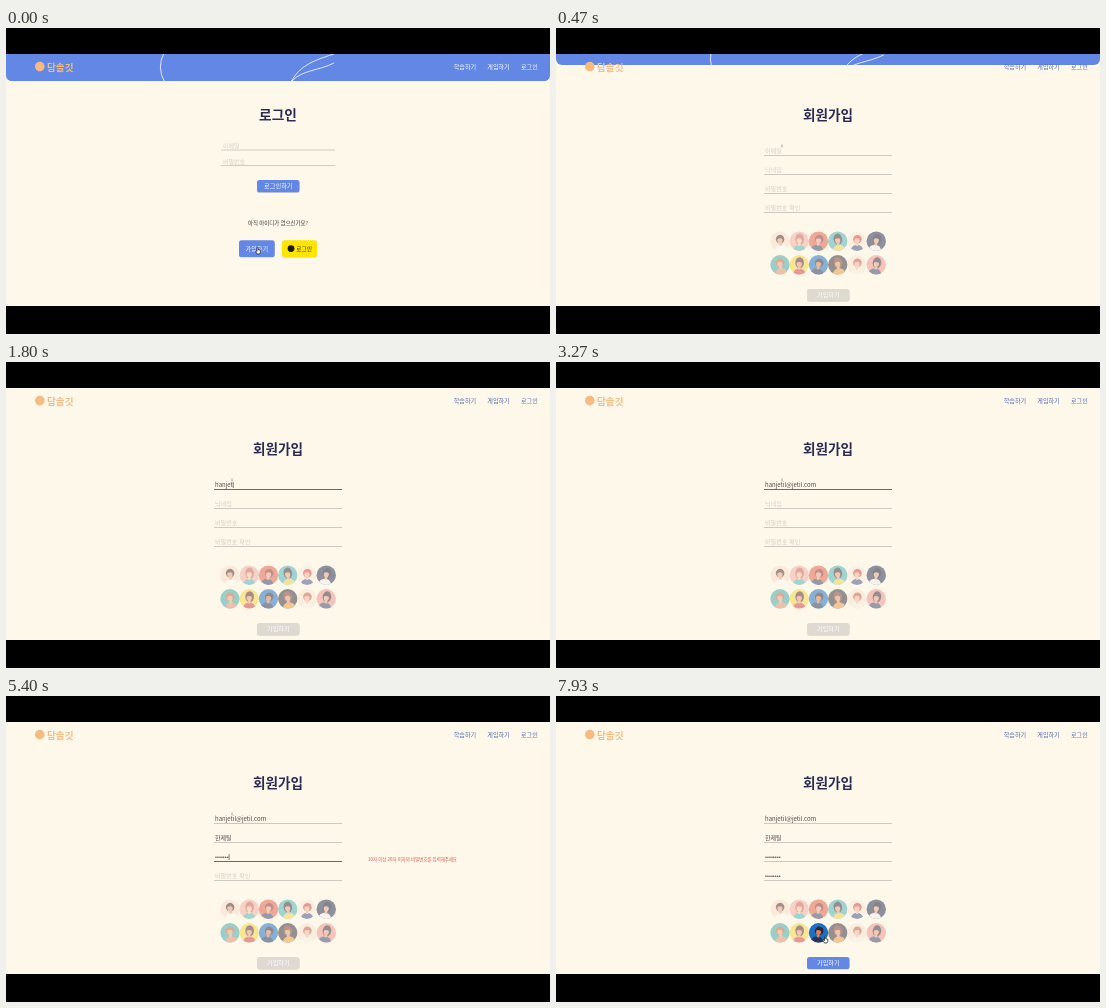
An HTML page for the animation above (8 s loop, 544 by 306 pixels).

```html
<!DOCTYPE html>
<html lang="ko">
<head>
<meta charset="utf-8">
<title>회원가입</title>
<style>
html, body { margin: 0; width: 100%; height: 100%; overflow: hidden; background: #000; }
#stage { display: block; width: 100vw; height: 100vh; }
text { font-family: "Noto Sans CJK KR", "Noto Sans CJK JP", "Noto Sans", sans-serif; white-space: pre; }
.dots { font-family: "Liberation Sans", sans-serif; }
</style>
</head>
<body>
<svg id="stage" viewBox="0 0 544 306"></svg>
<script>
const LOOP = 8000, SWITCH = 160, SELECT = 7930;
const BLUE = '#6387e4', CREAM = '#fdf8ea', INK = '#2b2a54', PALE = '#d3cec3';
const stage = document.getElementById('stage');
const el = id => document.getElementById(id);
const set = (id, attrs) => { for (const k in attrs) el(id).setAttribute(k, attrs[k]); };
const show = (id, on) => set(id, { visibility: on ? 'visible' : 'hidden' });

// Text placed by its left edge (or middle) and vertical centre.
function label(x, cy, size, fill, str, extra = '') {
  return `<text x="${x}" y="${cy + size * 0.37}" font-size="${size}" fill="${fill}" ${extra}>${str}</text>`;
}
const MID = 'text-anchor="middle"';

function button(x, y, w, h, fill, id = '') {
  return `<rect x="${x}" y="${y + 0.7}" width="${w}" height="${h}" rx="2.6" fill="#000" opacity=".14"/>
    <rect ${id} x="${x}" y="${y}" width="${w}" height="${h}" rx="2.6" fill="${fill}"/>`;
}
const line = (x1, x2, y, id = '') =>
  `<path ${id} d="M${x1} ${y}H${x2}" stroke="#c8c4bc" stroke-width=".9"/>`;

// background, hair, skin, clothes
const people = [
  ['#fbdccb', '#4a2f35', '#e9a183', '#fffaf2'], ['#f3aca6', '#c8625a', '#f3c2a8', '#4fb5b8'],
  ['#e2604f', '#8e2f3a', '#eda488', '#38456f'], ['#4fb3b8', '#38333f', '#e9a183', '#f3cf58'],
  ['#fbeadb', '#d8404c', '#f0b59a', '#43538a'], ['#2b3358', '#181c33', '#e5a38c', '#f3f0ee'],
  ['#3fa9ab', '#c9603f', '#eba585', '#e58d6b'], ['#f2d843', '#5b2a33', '#e79d84', '#d6404f'],
  ['#1d6fc6', '#2a2638', '#d9805c', '#25365c'], ['#36323d', '#7b4033', '#e29875', '#ee9a3e'],
  ['#fbe3d3', '#c05d55', '#f0b9a0', '#f4efe6'], ['#f0938f', '#3a2d42', '#e7a08a', '#3c4775']
];
const CHOSEN = 8;

function avatar([bg, hair, skin, body], i) {
  const x = 224 + (i % 6) * 19.25, y = i < 6 ? 213.2 : 236.8;
  const tilt = (i % 3 - 1) * 9;
  return `<g id="a${i}" opacity=".52" transform="translate(${x} ${y})"><circle r="9.7" fill="${bg}"/>
    <g clip-path="url(#disc)"><g transform="rotate(${tilt})">
    <ellipse cx=".4" cy="-2" rx="4.3" ry="${i % 2 ? 5.6 : 4.3}" fill="${hair}"/>
    <path d="M-7 11Q-6 4 0 3.6Q6 4 7 11Z" fill="${body}"/>
    <path d="M-1.2 0H1.4V4.2Q0 5.2-1.2 4.2Z" fill="${skin}"/>
    <ellipse cx="0" cy="-1" rx="2.6" ry="3.3" fill="${skin}"/>
    <path d="M-3-2Q-2-6 1-5.5Q4-5 3-1.5Q1-4-3-2Z" fill="${hair}"/></g></g></g>`;
}

// Each field: row centre, hint, focus span, key times and what each key leaves.
const mail = 'hanjetil@jetil.com';
const bullets = n => '•'.repeat(n);
const typed = (n, fn) => Array.from({ length: n }, (_, i) => fn(i + 1));
const fields = [
  { y: 123, hint: '이메일', from: 1330, to: 3400, out: typed(18, n => mail.slice(0, n)),
    keys: [1470, 1530, 1670, 1730, 1770, 1800, 1930, 2000, 2130, 2270, 2400, 2470, 2530, 2600, 2730, 2800, 2930, 3070] },
  { y: 142, hint: '닉네임', from: 3400, to: 4470,
    out: ['ㅎ', '하', '한', '한ㅈ', '한제', '한젵', '한제티', '한제틸'],
    keys: [3670, 3730, 3800, 4000, 4070, 4130, 4200, 4330] },
  { y: 161, hint: '비밀번호', from: 4470, to: 5930, out: typed(8, bullets), dots: true,
    keys: [4730, 4930, 5000, 5130, 5270, 5330, 5400, 5530] },
  { y: 180, hint: '비밀번호 확인', from: 5930, to: 6930, out: typed(8, bullets), dots: true,
    keys: [6000, 6070, 6200, 6270, 6330, 6470, 6530, 6730] }
];

function fieldMarkup(f, i) {
  return label(209, f.y, 6.1, PALE, f.hint, `id="h${i}"`) +
    label(209, f.y, f.dots ? 5.6 : 6, '#4c4a4a', '', `id="v${i}" ${f.dots ? 'class="dots"' : ''}`) +
    line(208, 336, f.y + 4.5, `id="l${i}"`) +
    `<path id="c${i}" stroke="#333" stroke-width=".6"/>`;
}

const loginPage = `<g id="login">
  ${label(272, 87, 13.7, INK, '로그인', MID + ' font-weight="700"')}
  ${label(217, 117.3, 6, PALE, '이메일')}${line(215, 329, 122)}
  ${label(217, 133.3, 6, PALE, '비밀번호')}${line(215, 329, 137.6)}
  ${button(251, 152, 42.5, 12.3, BLUE)}${label(272.3, 158.2, 6.2, '#fff', '로그인하기', MID)}
  ${label(272, 195.5, 5.4, '#3b3939', '아직 아이디가 없으신가요?', MID + ' font-weight="500"')}
  ${button(233, 212.3, 35.7, 16.7, BLUE)}${label(250.8, 220.8, 6.1, '#fff', '가입하기', MID)}
  ${button(276, 212.3, 35, 16.7, '#fee502')}<circle cx="285" cy="220.6" r="3.4" fill="#1d1a12"/>
  ${label(290.3, 220.8, 5.7, '#2b2610', '로그인')}</g>`;

const joinPage = `<g id="join">
  ${label(272, 87, 13.6, INK, '회원가입', MID + ' font-weight="700"')}
  ${fields.map(fieldMarkup).join('')}
  ${label(362, 163, 4.42, '#e2544c', '10자 이상 20자 이하의 비밀번호를 입력해주세요', 'id="err1"')}
  ${label(363, 182.3, 4.42, '#e2544c', '비밀번호가 일치하지 않습니다', 'id="err2"')}
  ${people.map(avatar).join('')}
  ${button(251, 261, 42.5, 12, '#dedad2', 'id="send"')}
  ${label(272.3, 267.2, 6.1, '#fff', '가입하기', MID)}</g>`;

stage.innerHTML = `<clipPath id="disc"><circle r="9.7"/></clipPath>
  <rect y="26" width="544" height="252" fill="${CREAM}"/>
  <svg id="head" y="26" width="544" height="27.3"><rect id="bar" y="-10" width="544" rx="6" fill="${BLUE}"/>
    <g id="arcs" fill="none" stroke="#fff" stroke-width=".8">
    <path d="M158 -1Q150.500 13 158.500 28"/><path d="M285 28C293 13 305 7 328 0"/>
    <path d="M286 27C296 16 312 17 328 9"/></g></svg>
  <circle cx="33.8" cy="38.6" r="4.8" fill="#f6bb80"/>
  ${label(41, 39.3, 9.6, '#f5bc84', '담솔깃', 'font-weight="700"')}
  <g id="nav">${label(447.700, 39, 6.1, 'inherit', '학습하기').replace('fill="inherit"', '')}
  ${label(481.300, 39, 6.1, 'inherit', '게임하기').replace('fill="inherit"', '')}
  ${label(515, 39, 6.1, 'inherit', '로그인').replace('fill="inherit"', '')}</g>
  ${loginPage}${joinPage}
  <path d="M0 0H544V26H0ZM0 278H544V306H0Z"/>
  <g id="mouse">
    <path id="hand" d="M-1-3Q-.3-3.800.2-3V-.8L2.300-.3V2L1.500 3.500H-1L-2.500.8L-1.800.3L-1 1Z" fill="#fff" stroke="#111" stroke-width=".7"/>
    <path id="beam" d="M-1.200-2.600H1.200M0-2.600V2.600M-1.200 2.600H1.200" fill="none" stroke="#222" stroke-width=".8"/>
    <path id="arrow" d="M-1.500-3V2L-.4 1.200L.5 3L1.300 2.600L.5.900H2Z" fill="#fff" stroke="#111" stroke-width=".6"/>
  </g>`;

// CSS "ease" curve
function ease(p) {
  if (p <= 0) return 0;
  if (p >= 1) return 1;
  let a = 0, b = 1, s;
  for (let i = 0; i < 20; i++) {
    s = (a + b) / 2;
    if (0.75 * s * (1 - s) + s ** 3 < p) a = s; else b = s;
  }
  return 0.3 * s * (1 - s) ** 2 + 3 * (1 - s) * s * s + s ** 3;
}

// time, x, y, size
const path = [
  [0, 252, 222.5, 1], [180, 252, 222.5, 1], [450, 226, 118, 0.4], [5760, 226, 118, 0.4],
  [5930, 236, 177.3, 1], [6740, 236, 177.3, 1], [7000, 377, 205, 1], [7210, 377, 205, 1],
  [7470, 295, 244.5, 1], [7620, 295, 244.5, 1], [7730, 269.5, 243.5, 1], [LOOP, 269.5, 243.5, 1]
];
function mouseAt(t) {
  const i = path.findIndex(k => k[0] > t);
  const a = path[i - 1], b = path[i], p = (t - a[0]) / (b[0] - a[0]);
  const q = p * p * (3 - 2 * p);
  return a.slice(1).map((v, j) => v + (b[j + 1] - v) * q);
}

function drawField(f, i, t) {
  const n = f.keys.filter(k => k <= t).length;
  const focus = t >= f.from && t < f.to;
  const value = el('v' + i), str = n ? f.out[n - 1] : '';
  if (value.textContent !== str) value.textContent = str;
  set('h' + i, { visibility: n ? 'hidden' : 'inherit' });
  set('l' + i, { stroke: focus ? '#5b5856' : '#c8c4bc' });
  const last = n ? f.keys[n - 1] : f.from;
  const caret = focus && t - last < 190;
  const x = 209.400 + (n ? value.getComputedTextLength() : 0);
  set('c' + i, { d: caret ? `M${x} ${f.y - 3}v6` : 'M0 0' });
}

function render(t) {
  const joined = t >= SWITCH;
  const h = 27.3 * (1 - ease((t - SWITCH) / 900));
  set('head', { height: Math.max(h, 0.01), visibility: h > 0.4 ? 'visible' : 'hidden' });
  set('bar', { height: h + 10 });
  set('arcs', { transform: `translate(0 ${(h - 27.3) / 2})` });
  set('nav', { fill: joined ? '#5068b4' : '#fff' });
  show('login', !joined);
  show('join', joined);
  fields.forEach((f, i) => drawField(f, i, t));
  set('err1', { visibility: t >= 4730 && t < 5530 ? 'inherit' : 'hidden' });
  set('err2', { visibility: t >= 6000 && t < 6730 ? 'inherit' : 'hidden' });
  set('a' + CHOSEN, { opacity: t >= SELECT ? 1 : 0.52 });
  set('send', { fill: t >= SELECT ? BLUE : '#dedad2' });
  const [x, y, k] = mouseAt(t);
  set('mouse', { transform: `translate(${x} ${y}) scale(${k})` });
  const hand = t < 200 || t > 7300, beam = t > 400 && t < 6780;
  show('hand', hand);
  show('beam', beam);
  show('arrow', !hand && !beam);
}

function tick() {
  render(performance.now() % LOOP);
  requestAnimationFrame(tick);
}
tick();
</script>
</body>
</html>
```
